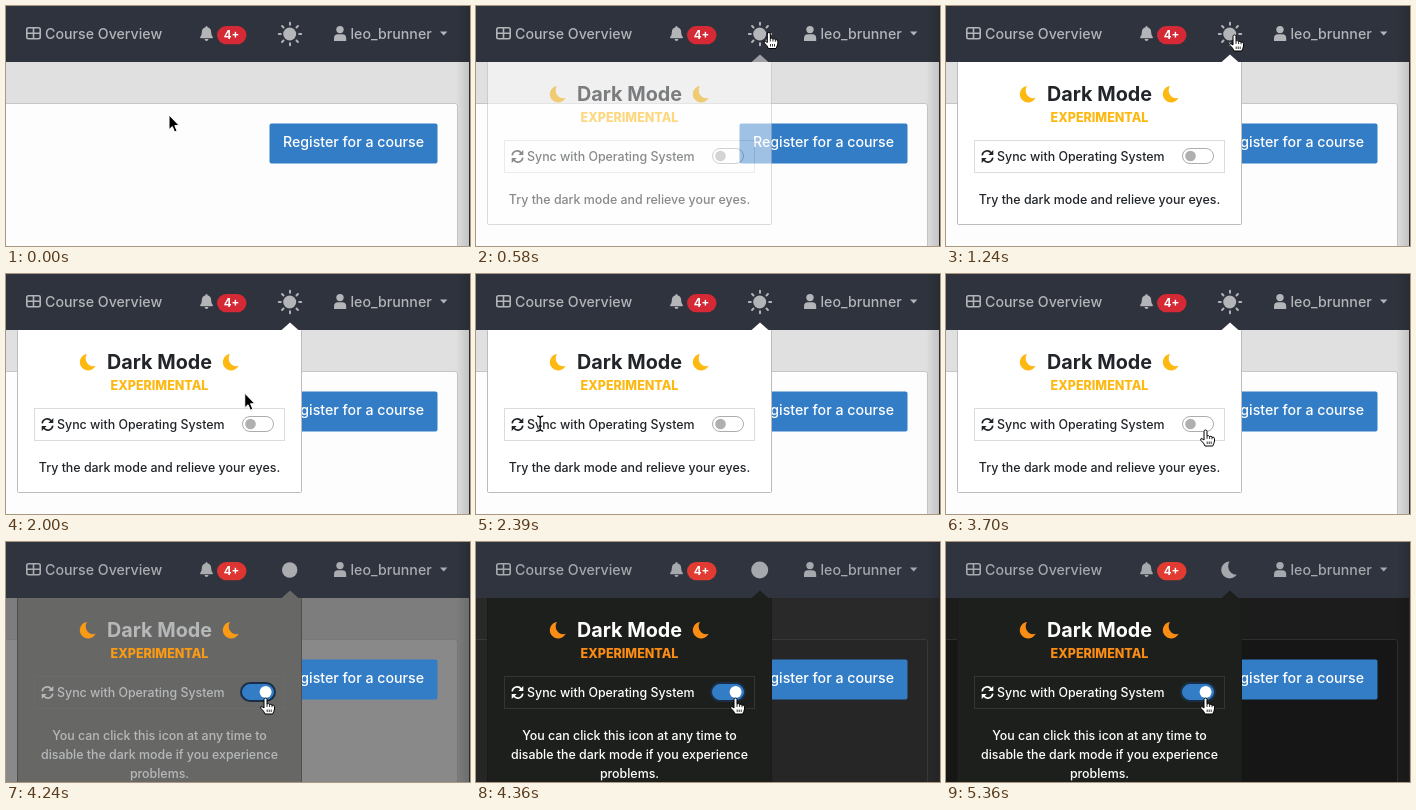
An HTML page for the animation above (5.39 s loop, 464 px wide and 240 px high).

```html
<!DOCTYPE html>
<html lang="en">
<head>
<meta charset="utf-8">
<title>Dark mode switch</title>
<style>
html, body { margin: 0; width: 100%; height: 100%; overflow: hidden; }
svg { display: block; width: 464px; height: 240px; }
text { font: 500 14.2px Inter, "Liberation Sans", sans-serif; }
.mid { text-anchor: middle; }
.nav, .nav text { fill: var(--nav); }
.line { fill: none; stroke-width: 1.6; }
#popup text { fill: var(--ink); font-size: 12.4px; }
#popup .title { font-size: 19.8px; font-weight: 700; }
#popup .tag { font-size: 12.5px; font-weight: 800; }
#popup .accent { fill: var(--accent); }
</style>
</head>
<body>
<svg viewBox="0 0 464 240">
  <defs>
    <linearGradient id="edge">
      <stop offset="0" stop-opacity="0"/>
      <stop offset="1" stop-opacity=".14"/>
    </linearGradient>
    <path id="moon" d="M-1-8A8.3 8.3 0 1 0 7.6 3.8A7.8 7.8 0 0 1-1-8Z"/>
    <mask id="bite" maskUnits="userSpaceOnUse" x="268" y="12" width="32" height="32">
      <rect x="268" y="12" width="32" height="32" fill="#fff"/>
      <circle id="shade" r="8.6"/>
    </mask>
  </defs>

  <rect width="464" height="240" fill="var(--page)"/>
  <path d="M-5 97.5H449q2.5 0 2.5 2.5V245H-5Z" fill="var(--panel)" stroke="var(--border)"/>
  <rect x="263.5" y="117.5" width="168" height="40" rx="2" fill="#337dc6"/>
  <text x="347.5" y="141" class="mid" fill="#fff">Register for a course</text>

  <rect width="464" height="56" fill="var(--bar)"/>
  <g class="nav">
    <path class="line" stroke="var(--nav)" d="M22.5 21.8h10q1.7 0 1.7 1.7v7.5q0 1.7-1.7 1.7h-10q-1.7 0-1.7-1.7v-7.5q0-1.7 1.7-1.7ZM27.5 22v10.5M21 27.2h13"/>
    <text x="39" y="33">Course Overview</text>
    <path d="M200.5 20q1 0 1 1.3q3.7.9 3.7 5.2q0 3 1.6 4.5q.5 1.3-.8 1.3h-11q-1.3 0-.8-1.3q1.6-1.5 1.6-4.5q0-4.3 3.7-5.2q0-1.3 1-1.3ZM198.5 33h4q-.3 2-2 2t-2-2Z"/>
    <circle cx="334" cy="23.6" r="3.7"/>
    <path d="M328 35v-2.5q0-4.2 4-4.2h4.2q4 0 4 4.2V35Z"/>
    <text x="344.5" y="33">leo_brunner</text>
    <path d="M434 25.5h7.4l-3.7 4Z"/>
  </g>
  <rect x="211" y="20" width="29.5" height="18.2" rx="9.1" fill="var(--badge)"/>
  <text x="225.5" y="33" class="mid" fill="#fff" style="font-size:11.5px;font-weight:700">4+</text>

  <g id="popup">
    <rect id="sheet" x="11.5" y="55.5" width="284" rx="1" fill="var(--sheet)" stroke="var(--rim)"/>
    <rect x="11" y="54" width="286" height="2" fill="var(--bar)"/>
    <path d="M275 56.5L284 48.5l9 8Z" fill="var(--sheet)"/>
    <use href="#moon" x="82" y="88" class="accent"/>
    <use href="#moon" x="225" y="88" class="accent"/>
    <text x="153.5" y="95" class="mid title">Dark Mode</text>
    <text x="153.5" y="115.7" class="mid tag accent">EXPERIMENTAL</text>
    <rect x="28.5" y="134.5" width="250" height="32" fill="none" stroke="var(--box)"/>
    <g class="line" stroke="var(--ink)">
      <path d="M36.2 149.3a5 5 0 0 1 9-2.3M46.8 151.7a5 5 0 0 1-9 2.3"/>
      <path fill="var(--ink)" stroke="none" d="M47.3 144v5h-5ZM35.7 157v-5h5Z"/>
    </g>
    <text x="51" y="155">Sync with Operating System</text>
    <rect id="ring" x="234" y="140" width="36" height="20" rx="10" fill="#1a2f47"/>
    <rect x="236.5" y="142.5" width="31" height="15" rx="7.5" fill="var(--track)" stroke="var(--trackline)"/>
    <circle id="knob" cy="150" fill="var(--knob)"/>
    <text id="invite" x="153.5" y="198" class="mid">Try the dark mode and relieve your eyes.</text>
    <g id="notice" class="mid">
      <text x="153.5" y="198">You can click this icon at any time to</text>
      <text x="153.5" y="217">disable the dark mode if you experience</text>
      <text x="153.5" y="236">problems.</text>
    </g>
  </g>

  <g fill="var(--nav)" stroke="var(--nav)">
    <g id="rays" stroke-width="2" stroke-linecap="round"></g>
    <circle id="disc" cx="283.7" cy="28" stroke="none" mask="url(#bite)"/>
  </g>
  <rect x="450" width="14" height="240" fill="url(#edge)"/>
  <rect x="463" width="1" height="240" fill="#2a2b2e"/>

  <g id="cursor" stroke-linejoin="round">
    <path id="arrow" d="M0 0V14.6L3.3 11.6L5.6 17L8.1 16L5.8 10.6H10.2Z" stroke="#fff"/>
    <g id="beam" fill="none">
      <path id="stem" d="M-3-7.5Q0-7.5 0-5Q0-7.5 3-7.5M0-5V5M-3 7.5Q0 7.5 0 5Q0 7.5 3 7.5M-1.5 2.5h3" stroke="#fff" stroke-width="3" opacity=".8"/>
      <path d="M-3-7.5Q0-7.5 0-5Q0-7.5 3-7.5M0-5V5M-3 7.5Q0 7.5 0 5Q0 7.5 3 7.5M-1.5 2.5h3" stroke="#000" stroke-width="1.2"/>
    </g>
    <g id="hand" stroke="#000">
      <path fill="#fff" d="M-2 1.5Q-2 0-.5 0T1 1.5V6Q2.5 5 3.6 6.5Q5 5.6 6 7.2Q8.3 6.6 8.5 8.7V11Q8 13.5 6.7 16H-1Q-2 13-5 10.5Q-6 8.4-4.2 8.5L-2 10Z"/>
      <path fill="none" stroke-width=".8" d="M1 6V9M3.6 6.5V9M6 7.2V9.3M1.2 11.5v2.5M3.2 11.5v2.5M5.2 11.5v2.5"/>
    </g>
  </g>
</svg>
<script>
const LOOP = 5390, CLICK = 4090, SWITCH = 4180;
const $ = id => document.getElementById(id);
const ramp = (t, a, b) => Math.min(1, Math.max(0, (t - a) / (b - a)));
const ease = x => x * x * (3 - 2 * x);
const mix = (a, b, k) => a + (b - a) * k;
const show = (id, on) => $(id).style.display = on ? '' : 'none';

// light and dark values
const page = {
  page: ['#e0e0e0', '#1c1c1c'], panel: ['#fdfdfd', '#161616'], border: ['#c6c6c6', '#2e2e2e']
};
const theme = {
  bar: ['#2f333d', '#2f343f'], nav: ['#b3b5b9', '#a5a8ac'],
  badge: ['#d52935', '#e23b31'], sheet: ['#ffffff', '#1d1f1c'],
  rim: ['#bcbcbc', '#1a1b19'], ink: ['#212529', '#ffffff'],
  accent: ['#fdb912', '#fb8c14'], box: ['#dcdcdc', '#343632']
};
const toggle = {
  track: ['#ffffff', '#337dc6'], trackline: ['#adadad', '#337dc6'], knob: ['#b0b0b0', '#ffffff']
};

// time, x, y of the pointer
const path = [
  [0, 163, 109], [40, 163, 109], [250, 238, 62], [450, 288, 30], [1000, 289, 29], [1290, 289, 29],
  [1640, 270, 72], [2000, 239, 119], [2180, 136, 145], [2480, 54, 150], [2740, 69, 152],
  [2880, 123, 155], [3080, 230, 153], [3270, 288, 150], [3420, 284, 157], [3680, 260, 156], [LOOP, 260, 156]
];

function blend(set, k) {
  const rgb = hex => [1, 3, 5].map(i => parseInt(hex.slice(i, i + 2), 16));
  for (const name in set) {
    const [a, b] = set[name].map(rgb);
    document.documentElement.style.setProperty('--' + name, `rgb(${a.map((v, i) => Math.round(mix(v, b[i], k)))})`);
  }
}

function slope(i, axis) {
  const a = path[i - 1], b = path[i], c = path[i + 1];
  if (!a || !c || (b[axis] - a[axis]) * (c[axis] - b[axis]) <= 0) return 0;
  return (c[axis] - a[axis]) / (c[0] - a[0]);
}

function pointer(t) {
  let i = 0;
  while (i < path.length - 2 && path[i + 1][0] <= t) i++;
  const a = path[i], b = path[i + 1], d = b[0] - a[0], u = (t - a[0]) / d;
  return [1, 2].map(n => mix(a[n], b[n], ease(u))
    + d * u * (1 - u) * (slope(i, n) * (1 - u) - slope(i + 1, n) * u));
}

function drawPointer(t) {
  const [x, y] = pointer(t);
  const within = (l, r, top, bottom) => x >= l && x <= r && y >= top && y <= bottom;
  const kind = within(272, 297, 14, 44) || within(235, 270, 141, 159) ? 'hand'
    : within(50, 220, 142, 160) ? 'beam' : 'arrow';
  for (const id of ['arrow', 'beam', 'hand']) show(id, id === kind);
  $('cursor').setAttribute('transform', `translate(${x} ${y})`);
}

function drawSun(t) {
  const gone = ease(ramp(t, CLICK + 20, 4340)), bite = ease(ramp(t, 4380, 4980));
  $('rays').setAttribute('transform', `translate(284 28) scale(${1 - gone})`);
  show('rays', gone < 1);
  $('disc').setAttribute('r', mix(6.5, 8.5, gone));
  $('shade').setAttribute('cx', mix(299, 290.8, bite));
  $('shade').setAttribute('cy', mix(13, 24.2, bite));
}

function draw(t) {
  const on = ease(ramp(t, CLICK, CLICK + 150)), dark = t >= SWITCH;
  blend(page, ramp(t, CLICK + 10, 4380));
  blend(theme, ramp(t, CLICK + 30, 4300));
  blend(toggle, on);
  $('popup').style.opacity = ramp(t, 470, 680);
  $('sheet').setAttribute('height', dark ? 260 : 163);
  $('ring').style.opacity = on;
  $('knob').setAttribute('cx', mix(244.5, 259.6, on));
  $('knob').setAttribute('r', mix(5.3, 6, on));
  show('invite', !dark);
  show('notice', dark);
  drawSun(t);
  drawPointer(t);
}

$('rays').innerHTML = Array.from({ length: 8 },
  (_, i) => `<path d="M0-9.2V-11.2" transform="rotate(${i * 45})"/>`).join('');

const start = performance.now();
function tick() {
  draw((performance.now() - start) % LOOP);
  requestAnimationFrame(tick);
}
tick();
</script>
</body>
</html>
```
